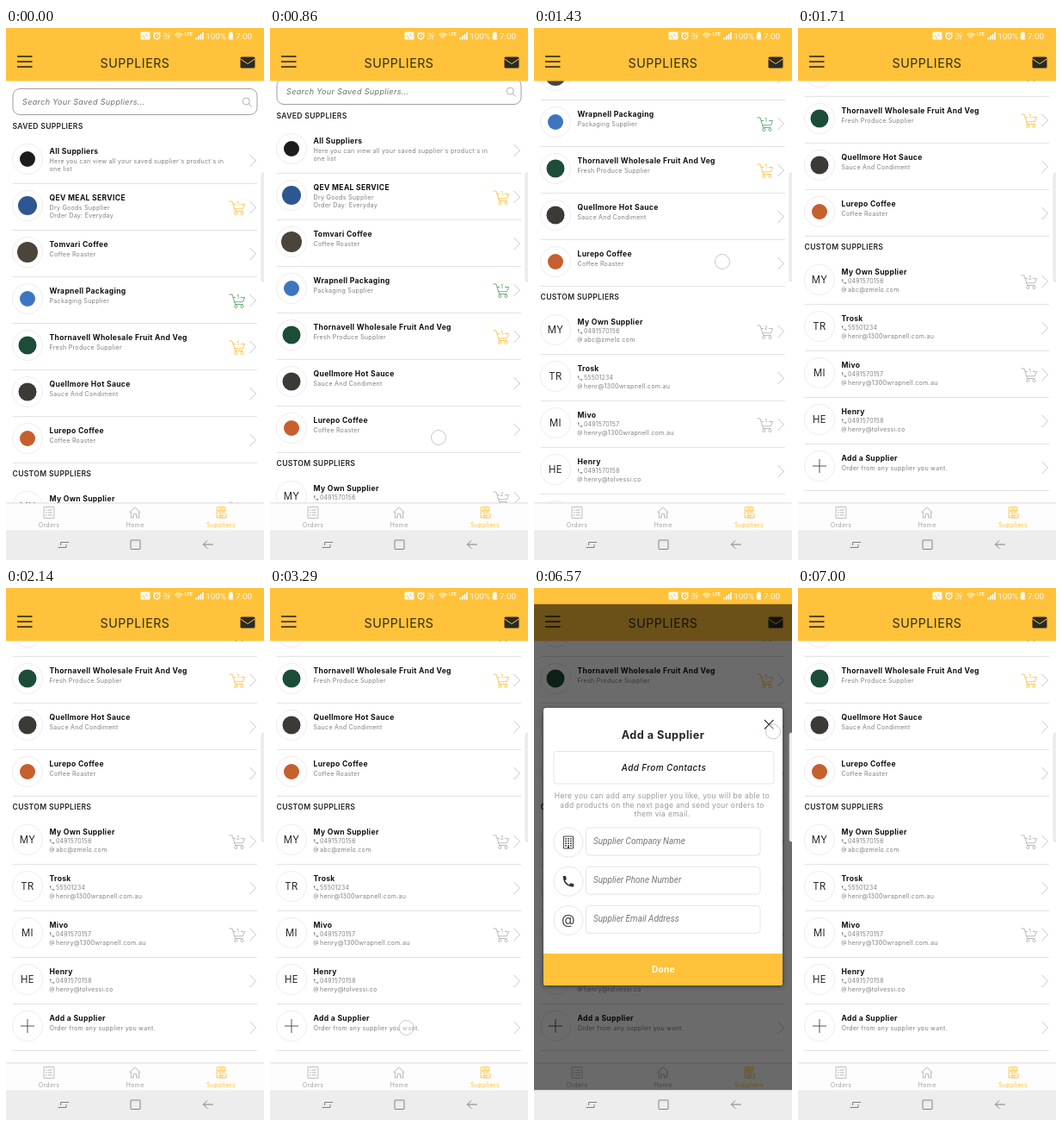
Recreate the animation shown at these times as an HTML page with a canvas. Size 300 by 617 pixels, loop 8000 ms.

```html
<!DOCTYPE html>
<html lang="en">
<head>
<meta charset="utf-8">
<title>Suppliers</title>
<style>
  html, body { margin: 0; width: 100%; height: 100%; overflow: hidden; background: #fff; }
  canvas { display: block; width: 300px; height: 617px; }
</style>
</head>
<body>
<canvas id="stage"></canvas>
<script>
const W = 300, H = 617, LOOP = 8000, FPS = 7;
const YELLOW = '#ffc23a', INK = '#252525', GREY = '#808080', LINE = '#e3e3e3', GREEN = '#5fa568';
const SANS = 'Inter, sans-serif', ROBOTO = 'Roboto, sans-serif';

const canvas = document.getElementById('stage');
const ctx = canvas.getContext('2d');
const ratio = window.devicePixelRatio || 1;
canvas.width = W * ratio;
canvas.height = H * ratio;

const saved = [
  { name: 'All Suppliers', lines: ['Here you can view all your saved supplier`s product`s in', 'one list'], dot: '#1c1c1c', r: 9 },
  { name: 'QEV MEAL SERVICE', lines: ['Dry Goods Supplier', 'Order Day: Everyday'], dot: '#2d5790', r: 11, cart: YELLOW, count: 1 },
  { name: 'Tomvari Coffee', lines: ['Coffee Roaster'], dot: '#4b443b', r: 12 },
  { name: 'Wrapnell Packaging', lines: ['Packaging Supplier'], dot: '#3c76c0', r: 9, cart: GREEN, count: 1 },
  { name: 'Thornavell Wholesale Fruit And Veg', lines: ['Fresh Produce Supplier'], dot: '#1d4c38', r: 10.5, cart: YELLOW, count: 1 },
  { name: 'Quellmore Hot Sauce', lines: ['Sauce And Condiment'], dot: '#3c3a36', r: 10.5 },
  { name: 'Lurepo Coffee', lines: ['Coffee Roaster'], dot: '#c65f2d', r: 9 }
];
const custom = [
  { name: 'My Own Supplier', initials: 'MY', phone: '0491570156', email: 'abc@zmelo.com', cart: '#b4b4b4', count: 2 },
  { name: 'Trosk', initials: 'TR', phone: '55501234', email: 'henr@1300wrapnell.com.au' },
  { name: 'Mivo', initials: 'MI', phone: '0491570157', email: 'henry@1300wrapnell.com.au', cart: '#b4b4b4', count: 1 },
  { name: 'Henry', initials: 'HE', phone: '0491570158', email: 'henry@tolvessi.co' },
  { name: 'Add a Supplier', plus: true, lines: ['Order from any supplier you want.'] }
];

// y is the middle of the capitals; the sans face is tracked a little wide
function text(s, x, y, size, { color = INK, weight = 400, align = 'left', family = SANS, italic = false } = {}) {
  ctx.font = `${italic ? 'italic ' : ''}${weight} ${size}px ${family}`;
  ctx.letterSpacing = family === SANS ? `${size * 0.035}px` : '0px';
  ctx.fillStyle = color;
  ctx.textAlign = align;
  ctx.fillText(s, x, y + size * 0.36);
}

function rect(x, y, w, h, color) {
  ctx.fillStyle = color;
  ctx.fillRect(x, y, w, h);
}

function path(points, color, width = 1, fill = false) {
  ctx.beginPath();
  points.forEach(([x, y], i) => i ? ctx.lineTo(x, y) : ctx.moveTo(x, y));
  paint(color, width, fill);
}

function paint(color, width, fill) {
  if (fill) {
    ctx.fillStyle = color;
    ctx.fill();
  } else {
    ctx.strokeStyle = color;
    ctx.lineWidth = width;
    ctx.stroke();
  }
}

function circle(x, y, r, color, width = 1, fill = false) {
  ctx.beginPath();
  ctx.arc(x, y, r, 0, Math.PI * 2);
  paint(color, width, fill);
}

function arc(x, y, r, from, to, color, width = 1) {
  ctx.beginPath();
  ctx.arc(x, y, r, from, to);
  paint(color, width, false);
}

function box(x, y, w, h, r, color, width = 1, fill = false) {
  ctx.beginPath();
  ctx.roundRect(x, y, w, h, r);
  paint(color, width, fill);
}

function at(x, y, scale, draw) {
  ctx.save();
  ctx.translate(x, y);
  ctx.scale(scale, scale);
  draw();
  ctx.restore();
}

function cart(x, y, color, count) {
  at(x, y, 1, () => {
    path([[-9.5, -7], [-6, -7], [-2.5, 4.5], [6.5, 4.5]], color, 0.9);
    path([[-5, -3.5], [-2, -3.5]], color, 0.9);
    path([[4, -3.5], [8.5, -3.5], [6.5, 1.8], [-3.5, 1.8]], color, 0.9);
    circle(-1.7, 7, 1.6, color, 0.9);
    circle(5.5, 7, 1.6, color, 0.9);
    text(count, 0.8, -4, 6.5, { color, align: 'center', weight: 500 });
  });
}

function phoneIcon(x, y, scale, color) {
  at(x, y, scale, () => {
    ctx.beginPath();
    ctx.moveTo(-6, -6);
    ctx.lineTo(-3, -6);
    ctx.lineTo(-2, -2.4);
    ctx.lineTo(-3.8, -0.8);
    ctx.quadraticCurveTo(-2.2, 2.4, 0.8, 3.8);
    ctx.lineTo(2.4, 2);
    ctx.lineTo(6, 3);
    ctx.lineTo(6, 6);
    ctx.quadraticCurveTo(-5.6, 6, -6, -6);
    paint(color, 1, true);
  });
}

function chevron(x, y) {
  path([[x, y - 7], [x + 7, y], [x, y + 7]], '#bdbdbd', 0.9);
}

function row(item, y) {
  const mid = y + 9;
  circle(25, mid, 17.5, '#e8e8e8', 0.8);
  if (item.dot) circle(25, mid, item.r, item.dot, 1, true);
  if (item.initials) text(item.initials, 25, mid, 11.3, { align: 'center' });
  if (item.plus) {
    path([[17, mid], [33, mid]], '#555', 1);
    path([[25, mid - 8], [25, mid + 8]], '#555', 1);
  }
  text(item.name, 50.5, y, 8.6, { weight: 700, color: '#111' });
  (item.lines || []).forEach((s, i) => text(s, 50.5, y + 11 + i * 9.3, 7.15, { color: GREY }));
  if (item.phone) {
    phoneIcon(53.5, y + 11, 0.45, GREY);
    text(item.phone, 58, y + 11, 6.9, { color: GREY });
    text('@', 50.2, y + 20, 6.4, { color: GREY });
    text(item.email, 58, y + 20.3, 7.15, { color: GREY });
  }
  if (item.cart) cart(269, y + 11, item.cart, item.count);
  chevron(283.5, y + 11);
  rect(8, y + 37, 284, 1, LINE);
}

function list(scroll) {
  ctx.save();
  ctx.beginPath();
  ctx.rect(0, 61, W, 490);
  ctx.clip();
  ctx.translate(0, -scroll);
  box(8, 70.5, 284, 30, 8, '#959595', 0.9);
  text('Search Your Saved Suppliers...', 19, 86, 9.1, { color: '#707070', italic: true });
  circle(279.3, 85, 4, '#b0b0b0', 1);
  path([[282.3, 88], [286, 91.5]], '#b0b0b0', 1);
  text('SAVED SUPPLIERS', 7.5, 114, 8.6, { weight: 600 });
  saved.forEach((item, i) => row(item, 143 + 54 * i));
  text('CUSTOM SUPPLIERS', 7.5, 517, 8.6, { weight: 600 });
  custom.forEach((item, i) => row(item, 546 + 54 * i));
  ctx.restore();
}

function statusBar() {
  const white = '#fffaf0', opt = { color: white, family: ROBOTO };
  rect(0, 0, W, 18.5, YELLOW);
  box(156.5, 4.5, 11, 9, 1, white, 1, true);
  arc(158, 12.5, 3.5, -Math.PI / 2, 0, YELLOW, 0.9);
  path([[162, 7], [165, 10]], YELLOW, 0.9);
  circle(175.5, 9.3, 3.4, white, 1.5);
  path([[175.5, 7.3], [175.5, 9.5], [177, 9.5]], white, 0.8);
  path([[171.5, 6.5], [173.3, 4.8]], white, 1.2);
  path([[177.7, 4.8], [179.5, 6.5]], white, 1.2);
  text('Vo)', 183, 6.8, 5, opt);
  text('LTE', 183, 11.2, 5, opt);
  [2, 4.2, 6.4].forEach(r => arc(201, 12.5, r, -Math.PI * 0.76, -Math.PI * 0.24, white, 1.1));
  text('LTE', 208, 7, 5.5, { ...opt, weight: 700 });
  for (let i = 0; i < 4; i++) rect(220.5 + i * 2.5, 11 - i * 2, 1.7, 2.5 + i * 2, white);
  text('100%', 232.3, 9.5, 9.8, opt);
  rect(258.8, 5.5, 5, 8, white);
  rect(260.3, 4.2, 2, 1.5, white);
  text('7:00', 267, 9.5, 9.8, opt);
}

function header() {
  rect(0, 0, W, 61.5, YELLOW);
  [33, 39, 45].forEach(y => rect(13, y - 0.8, 17.5, 1.6, '#2f2a1c'));
  text('SUPPLIERS', 150, 40.5, 14.2, { align: 'center', color: '#2f2a1c' });
  box(272.5, 33.5, 17, 13, 1.5, '#2b2a28', 1, true);
  path([[272.5, 35.8], [281, 41.5], [289.5, 35.8]], YELLOW, 1);
}

function sheetIcon(x, y, color) {
  box(x - 6, y - 6.5, 12, 13, 0.5, color, 0.9);
  [-3, 0, 3].forEach(d => {
    rect(x - 4, y + d - 0.5, 1.6, 1, color);
    rect(x - 1.2, y + d - 0.5, 5, 1, color);
  });
}

function shopIcon(x, y, color) {
  box(x - 4.8, y - 6.3, 9.6, 4.5, 0.5, color, 1);
  path([[x - 2.8, y - 4.2], [x + 2.8, y - 4.2]], color, 1);
  path([[x - 4.8, y - 1.5], [x - 4.8, y + 6], [x + 6, y + 6], [x + 6, y + 1]], color, 1);
  [-2, 0.5, 3].forEach(d => path([[x - 3, y + d], [x + 4.5, y + d]], color, 0.9));
  box(x - 1.5, y + 3.4, 3, 2.6, 0, color, 0.8);
}

function tabs() {
  const soft = '#b4b4b4';
  rect(0, 551, W, 32, '#fdfdfd');
  rect(0, 550.5, W, 0.9, '#d6d6d6');
  sheetIcon(50, 562, soft);
  path([[143.5, 562], [150, 555.8], [156.5, 562]], soft, 1);
  path([[145.3, 561], [145.3, 568], [148.2, 568], [148.2, 563.8], [151.8, 563.8], [151.8, 568], [154.7, 568], [154.7, 561]], soft, 1);
  shopIcon(250, 562, YELLOW);
  const label = (s, x, color) => text(s, x, 576.3, 7.2, { color, align: 'center' });
  label('Orders', 50, '#a6a6a6');
  label('Home', 150, '#a6a6a6');
  label('Suppliers', 250, YELLOW);
}

function systemBar() {
  const c = '#808080';
  rect(0, 582.5, W, 34.5, '#ededed');
  path([[63.5, 600], [63.5, 596.5], [73, 596.5]], c, 1);
  path([[60.5, 602.5], [70, 602.5], [70, 599]], c, 1);
  box(145, 594, 11, 10.5, 0.5, c, 1);
  path([[241, 599], [229.5, 599]], c, 1);
  path([[234, 594.5], [229.5, 599], [234, 603.5]], c, 1);
}

function edgeHandle() {
  box(297, 168, 6, 126, 2, '#ededed', 1, true);
  box(297, 168, 6, 126, 2, '#d8d8d8', 0.6);
}

function building(x, y) {
  box(x - 5.5, y - 7, 11, 14, 0, '#444', 1);
  for (let r = 0; r < 4; r++)
    for (let c = 0; c < 3; c++) rect(x - 3.8 + c * 2.9, y - 5 + r * 2.7, 1.8, 1.6, '#444');
  rect(x - 1, y + 4.7, 2, 2.3, '#444');
}

function dialog() {
  rect(0, 18.5, W, 564, 'rgba(0,0,0,0.58)');
  ctx.save();
  ctx.shadowColor = 'rgba(0,0,0,0.5)';
  ctx.shadowBlur = 5 * ratio;
  ctx.shadowOffsetY = ratio;
  box(11, 139, 278, 322, 3, '#fff', 1, true);
  ctx.restore();
  path([[268, 153], [278.5, 163.5]], '#333', 1.1);
  path([[278.5, 153], [268, 163.5]], '#333', 1.1);
  text('Add a Supplier', 150, 170, 12.7, { weight: 700, align: 'center' });
  box(23, 189.5, 256, 37.5, 3, LINE, 0.9);
  text('Add From Contacts', 151, 208.3, 10, { color: '#111', italic: true, align: 'center', weight: 500 });
  ['Here you can add any supplier you like, you will be able to',
   'add products on the next page and send your orders to',
   'them via email.'].forEach((s, i) => text(s, 149, 241 + i * 10.5, 8.5, { color: '#999', align: 'center' }));
  ['Company Name', 'Phone Number', 'Email Address'].forEach((s, i) => {
    const y = 294 + 45.2 * i;
    circle(40, y + 1, 17, LINE, 0.9);
    box(60.5, y - 16, 202.5, 32, 4, LINE, 0.9);
    text('Supplier ' + s, 69, y - 0.7, 10, { color: '#777', italic: true, family: ROBOTO });
  });
  building(40, 295);
  phoneIcon(40, 340.2, 1.05, '#333');
  text('@', 40, 384.5, 16, { color: '#444', align: 'center' });
  ctx.beginPath();
  ctx.roundRect(11, 424, 278, 37, [0, 0, 3, 3]);
  paint(YELLOW, 1, true);
  text('Done', 150.5, 442.8, 10, { color: '#fff', weight: 700, align: 'center' });
}

// Drag with a release that settles at the end of the list
function scrollAt(step) {
  const stops = [0, 12, 50, 107, 160, 205, 247, 263];
  return stops[Math.max(0, Math.min(stops.length - 1, step - 5))];
}

function touchAt(step) {
  if (step === 5) return [195.5, 506];
  if (step === 6) return [196, 475];
  if (step > 6 && step < 11) return [196 + (step - 6) * 5.75, 476 - scrollAt(step)];
  if (step === 22) return [156.5, 510];
  if (step === 23) return [158.5, 510];
  if (step === 46) return [278, 166.5];
  return null;
}

function draw(time) {
  const step = Math.floor((time + 6) * FPS / 1000);
  ctx.setTransform(ratio, 0, 0, ratio, 0, 0);
  rect(0, 0, W, H, '#fff');
  list(scrollAt(step));
  header();
  tabs();
  if (step >= 24 && step < 47) dialog();
  statusBar();
  systemBar();
  edgeHandle();
  const touch = touchAt(step);
  if (touch) {
    circle(...touch, 8.5, 'rgba(255,255,255,0.4)', 1, true);
    circle(...touch, 8.5, '#bcc3c9', 0.9);
  }
}

const start = performance.now();
function tick() {
  draw((performance.now() - start) % LOOP);
  requestAnimationFrame(tick);
}
tick();
</script>
</body>
</html>
```
